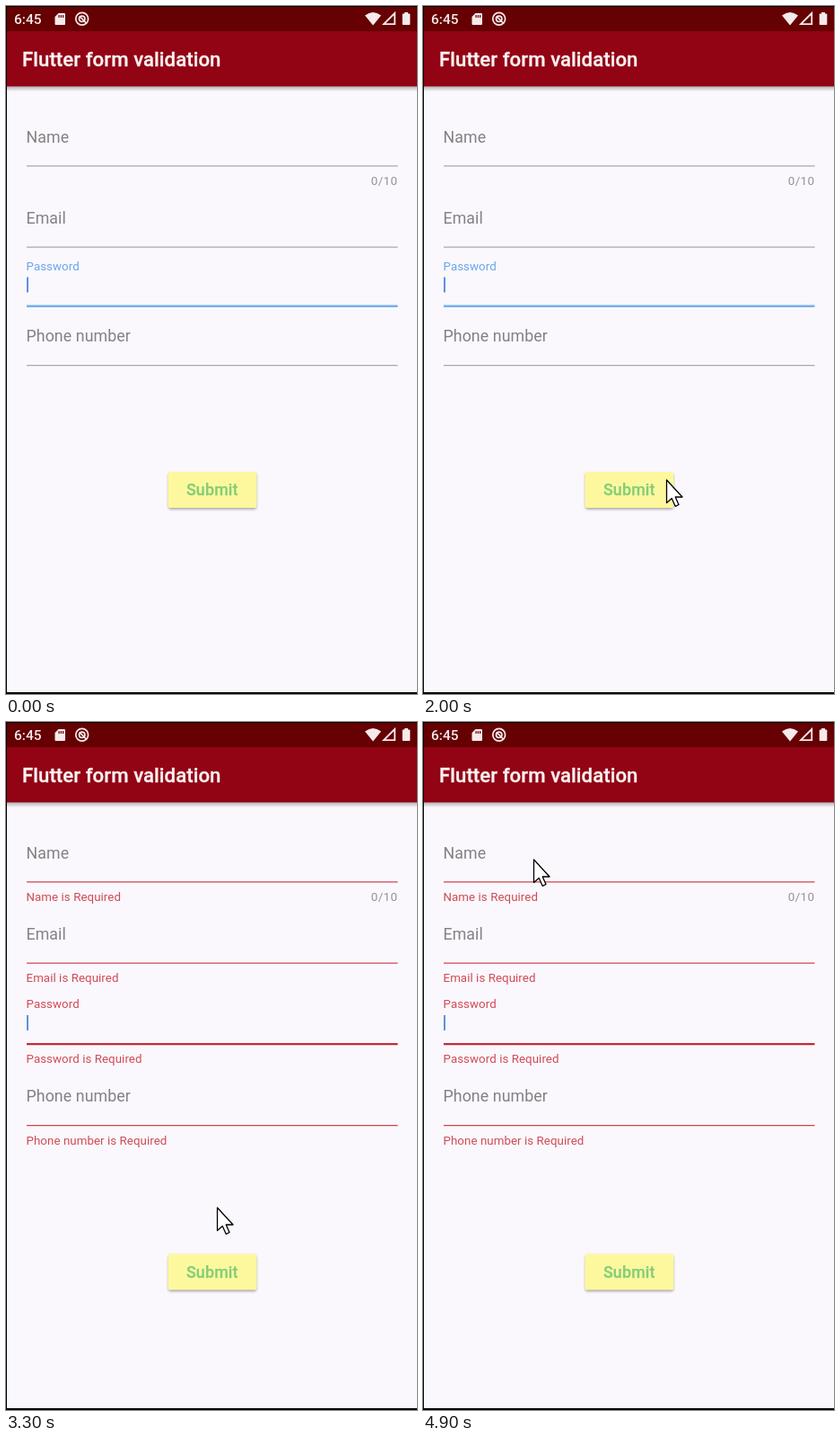
Write an HTML page that moves like this. It is 458 by 765 pixels and loops after 5000 ms.

```html
<!DOCTYPE html>
<html lang="en">
<head>
<meta charset="utf-8">
<title>Form validation</title>
<style>
html, body { margin: 0; width: 100%; height: 100%; overflow: hidden; background: #000; }
svg { display: block; width: 458px; height: 765px; font-family: Roboto, sans-serif; }
.label { font-size: 17.77px; letter-spacing: .08px; fill: #838186; }
.small { font-size: 13.33px; letter-spacing: .05px; }
.error { fill: #d04b56; }
</style>
</head>
<body>
<svg viewBox="0 0 458 765">
  <defs>
    <linearGradient id="shade" x2="0" y2="1">
      <stop stop-color="#000" stop-opacity=".28"/>
      <stop offset="1" stop-color="#000" stop-opacity="0"/>
    </linearGradient>
    <filter id="blur" x="-20%" y="-30%" width="140%" height="170%"><feGaussianBlur stdDeviation="1.5"/></filter>
  </defs>
  <path fill="#faf8fc" d="M1 1H458V763H1z"/>
  <path fill="#650003" d="M1 1H458V28H1z"/>
  <path fill="#920314" d="M1 28H458V89.500H1z"/>
  <path fill="url(#shade)" d="M1 89.500H458V95H1z"/>

  <g fill="#f6eaea">
    <text x="9" y="20" font-size="15.500" font-weight="500">6:45</text>
    <path d="M58.500 8H65q1 0 1 1V20q0 1-1 1H55.500q-1 0-1-1V12z"/>
    <path fill="#650003" d="M58.500 10h1.200v3h-1.200zM60.800 10H62v3h-1.200zM63 10h1.200v3H63z"/>
    <path d="M400 10.500Q409 3.500 418 10.500L409 21.500z"/>
    <path fill="none" stroke="#f6eaea" stroke-width="1.800" d="M421 20.200H433.200V8z"/>
    <path d="M444 7h4v1.500h1.500q.8 0 .8.800V20.200q0 .8-.8.800h-7q-.8 0-.8-.800V9.300q0-.800.8-.800H444z"/>
    <g fill="none" stroke="#f6eaea" stroke-width="1.700">
      <circle cx="84.700" cy="14.300" r="6.900"/>
      <circle cx="84.700" cy="14.300" r="3.200"/>
      <path d="M82 11.500L90 19.500"/>
    </g>
  </g>
  <text x="18" y="67" font-size="22.200" font-weight="500" letter-spacing=".06" fill="#faf1f2" stroke="#faf1f2" stroke-width=".35">Flutter form validation</text>

  <g id="fields"></g>
  <text class="small" x="436.400" y="199" text-anchor="end" style="letter-spacing:.4px" fill="#949297">0/10</text>
  <path id="caret" fill="#5d91dd" d="M23 301.500h2V318.500h-2z"/>

  <g id="button">
    <rect id="shadow" x="181" y="520" width="98" height="39.500" rx="2" filter="url(#blur)"/>
    <rect x="180.500" y="518" width="98.800" height="40" rx="2" fill="#fdf89e"/>
    <text x="229.800" y="544" text-anchor="middle" font-size="17.770" font-weight="500" letter-spacing=".2" fill="#83cd79" stroke="#83cd79" stroke-width=".25">Submit</text>
  </g>
  <path id="pointer" fill="#fff" stroke="#000" stroke-width="1.300" stroke-linejoin="round"
    d="M.5 0V25.500L6.200 20.500L10.200 29.300L14 27.500L10.200 19H18z"/>
</svg>
<script>
const LOOP = 5000, STEP = 100, SHIFT_AT = 3000, ERROR_AT = 3100;
const $ = id => document.getElementById(id);

// label baseline, underline and downward shift once error rows open
const fields = [
  { name: 'Name', y: 151.5, line: 177.8, shift: 0 },
  { name: 'Email', y: 241.5, line: 268.2, shift: 0 },
  { name: 'Password', y: 294, line: 333.7, shift: 24.4, focused: true },
  { name: 'Phone number', y: 373, line: 399.7, shift: 49 }
];
$('fields').innerHTML = fields.map(f => `<g>
  <text class="${f.focused ? 'small' : 'label'}" x="22.500" y="${f.y}">${f.name}</text>
  <path d="M23 ${f.line}H436.500" stroke-width="${f.focused ? 2.4 : 1.2}"/>
  <text class="small error" x="22.500" y="${f.line + 21.2}">${f.name} is Required</text>
</g>`).join('');
const groups = [...$('fields').children];

// time, x, y of the pointer tip
const track = [
  [900, 458, 390], [1400, 323, 462], [2000, 271, 527], [2500, 235, 540],
  [3300, 235, 540], [3900, 214.5, 388], [4300, 122, 153], [4500, 122, 153], [4700, 123, 153], [LOOP, 123, 153]
];

function pointerAt(t) {
  const i = track.findIndex(p => t < p[0]);
  const [t0, x0, y0] = track[i - 1], [t1, x1, y1] = track[i];
  const k = (t - t0) / (t1 - t0), e = k * k * (3 - 2 * k);
  return [x0 + (x1 - x0) * e, y0 + (y1 - y0) * e];
}

const move = (el, x, y) => el.setAttribute('transform', `translate(${x} ${y})`);

function draw(now) {
  const t = Math.floor(now % LOOP / STEP) * STEP;
  const open = t >= SHIFT_AT;
  const errorAlpha = Math.min(1, Math.max(0, (t - ERROR_AT + STEP) / 200));
  const invalid = t >= ERROR_AT;

  fields.forEach((f, i) => {
    const [label, line, error] = groups[i].children;
    move(groups[i], 0, open ? f.shift : 0);
    if (f.focused) label.setAttribute('fill', invalid ? '#d04b56' : open ? '#559fee' : '#68a5ec');
    const idle = f.focused ? (open ? '#489ded' : '#76b0ed') : '#aaa8ad';
    line.setAttribute('stroke', invalid ? (f.focused ? '#c42c38' : '#cf4650') : idle);
    error.setAttribute('opacity', errorAlpha);
  });

  const blinkOn = (t + 100) % 1000 < 500;
  const paused = t >= 2900 && t < ERROR_AT;
  $('caret').setAttribute('opacity', blinkOn && !paused ? 1 : 0);
  move($('caret'), 0, open ? 24.4 : 0);
  move($('button'), 0, open ? 73.5 : 0);
  $('shadow').setAttribute('opacity', t === SHIFT_AT ? .5 : .36);

  const visible = t >= track[0][0];
  $('pointer').setAttribute('opacity', visible ? 1 : 0);
  if (visible) move($('pointer'), ...pointerAt(t));
}

function tick() {
  draw(performance.now());
  requestAnimationFrame(tick);
}
tick();
</script>
</body>
</html>
```
